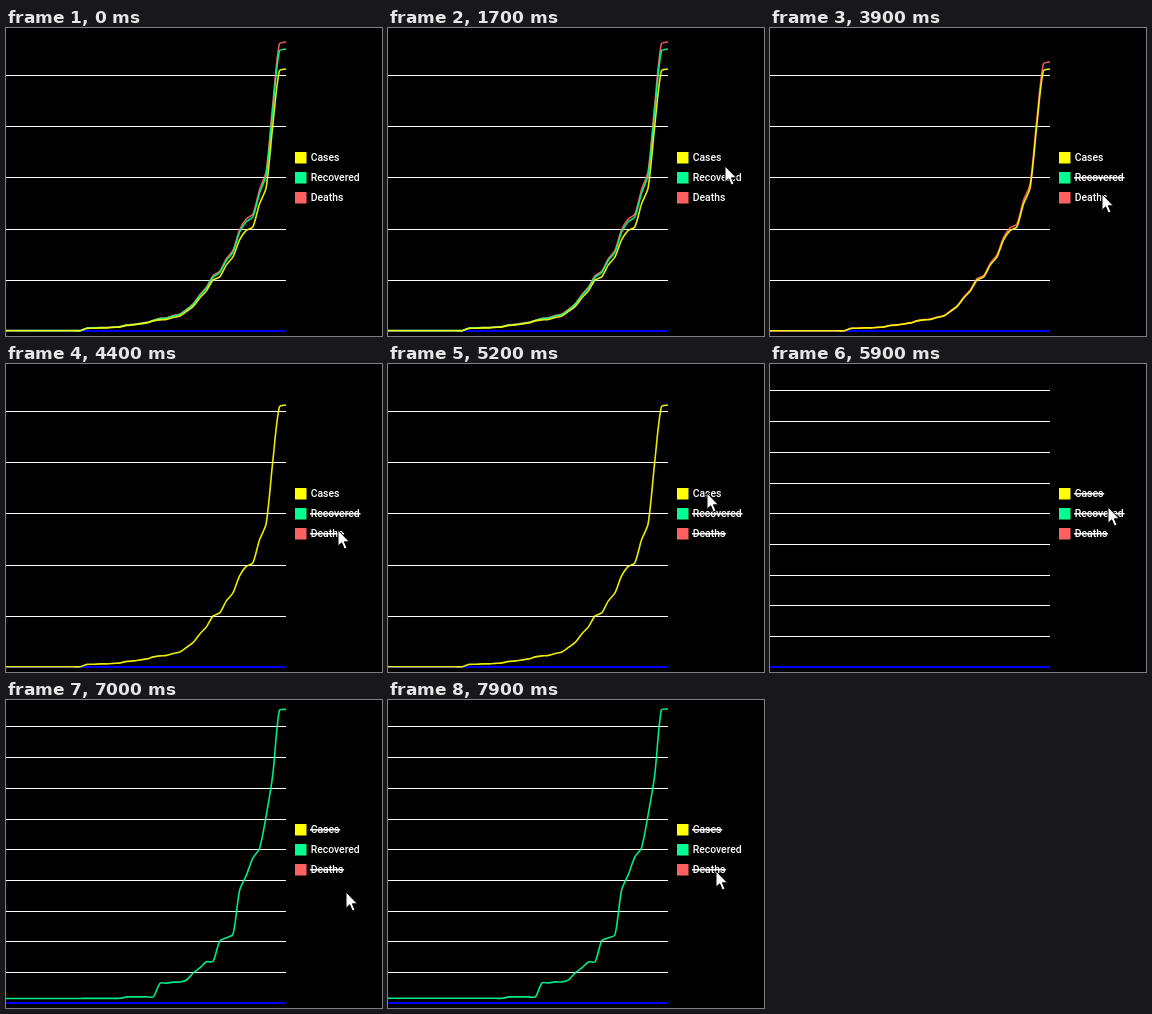
An HTML page that plays this animation: 376x308 px, repeating every 8000 ms.

```html
<!DOCTYPE html>
<html lang="en">
<head>
<meta charset="utf-8">
<title>Stacked line chart</title>
<style>
  html, body { margin: 0; width: 100%; height: 100%; overflow: hidden; background: #000; }
  svg { display: block; width: 376px; height: 308px; }
  text { font: 500 10.4px Roboto, Arial, sans-serif; fill: #fff; }
  .line { fill: none; stroke-width: 1.6; stroke-linejoin: round; }
</style>
</head>
<body>
<svg viewBox="0 0 376 308">
  <rect width="376" height="308"/>
  <g id="grid"></g>
  <rect y="302" width="280" height="2" fill="#00f"/>
  <g id="lines"></g>
  <g id="legend"></g>
  <path id="cursor" d="M0 0V16.2L3.7 12.8L6.3 19L9 17.9L6.4 11.8H11.4Z"
        fill="#fff" stroke="#000" stroke-width="1"/>
</svg>
<script>
const LOOP = 8000, STEP = 100, EASE_MS = 1000;
const BASE = 302.9, RIGHT = 280, GAP = 6.63;

// Moments at which a legend entry is clicked
const HIDE_RECOVERED = 2640, HIDE_DEATHS = 3950, HIDE_CASES = 5350, SHOW_RECOVERED = 6440;

// Heights in px, newest day first
const COUNT = 44;
const pad = (list, rest) => Array.from({ length: COUNT }, (_, i) => list[i] ?? rest);
const cases = pad([262, 260, 205, 143, 127, 104, 100.5, 91, 74, 66, 54, 51, 40, 33, 24.5, 19.5,
  15, 13.5, 11.5, 11, 10, 8, 7, 6, 5.5, 4, 3.5, 3, 3, 2.7, 2.5], 0.1);
const recoveredAlone = pad([294, 293, 228, 188, 155, 146, 128, 113, 68, 65, 62, 41, 41, 35, 30, 23,
  21, 21, 20, 20, 6, 6, 6, 6, 6], 4.6);
const recovered = cases.map((c, i) => c + recoveredAlone[i] * 0.068);
const deathsOnCases = cases.map(c => c * 1.027);
const deathsOnTop = cases.map((c, i) => recovered[i] + c * 0.027);

const cursorPath = [
  [1700, 337, 138], [1800, 340, 144], [2000, 332, 146], [2600, 332, 146],
  [2900, 332, 161], [3300, 332, 166], [4500, 332, 166], [4800, 319, 129],
  [5400, 319, 129], [5800, 338, 143], [6450, 338, 143], [6600, 323, 204],
  [7000, 340, 192], [7500, 328, 171], [LOOP, 328, 171]
];

const $ = id => document.getElementById(id);
function add(parent, tag, attrs, text = "") {
  const el = document.createElementNS("http://www.w3.org/2000/svg", tag);
  for (const k in attrs) el.setAttribute(k, attrs[k]);
  el.textContent = text;
  return parent.appendChild(el);
}
const show = (el, on) => el.setAttribute("visibility", on ? "visible" : "hidden");
const lerp = (a, b, p) => a + (b - a) * p;
const mix = (a, b, p) => a.map((v, i) => lerp(v, b[i], p));
const easeOut = p => 1 - (1 - Math.min(Math.max(p, 0), 1)) ** 4;

function makeGrid(gap) {
  const g = add($("grid"), "g", { fill: "#fff" });
  for (let y = BASE - gap; y > 0; y -= gap) {
    add(g, "rect", { y: Math.round(y), width: RIGHT, height: 1 });
  }
  return g;
}
const wideGrid = makeGrid(51.17), denseGrid = makeGrid(30.73);

const series = [["Cases", "#ffff00"], ["Recovered", "#00ff90"], ["Deaths", "#ff6060"]]
  .map(([name, color], i) => {
    const y = 124 + i * 20;
    add($("legend"), "rect", { x: 289, y, width: 11.5, height: 11.5, fill: color });
    const label = add($("legend"), "text", { x: 304.7, y: y + 9.3 }, name);
    const strike = add($("legend"), "rect", { x: 304, y: y + 5, height: 1.5, fill: "#fff" });
    return { label, strike, color };
  });
for (const s of [...series].reverse()) {
  s.line = add($("lines"), "path", { class: "line", stroke: s.color, "stroke-opacity": 0.92 });
}
const [casesItem, recoveredItem, deathsItem] = series;

// Cardinal spline whose handles scale with the neighbouring segment lengths
function spline(heights) {
  const pts = heights.map((h, i) => [RIGHT - i * GAP, BASE - h]);
  const handles = pts.map((p, i) => {
    const a = pts[i - 1] || p, b = pts[i + 1] || p;
    const before = Math.hypot(p[0] - a[0], p[1] - a[1]);
    const after = Math.hypot(b[0] - p[0], b[1] - p[1]);
    const k = 0.25 / (before + after);
    const at = s => [p[0] + (b[0] - a[0]) * s, p[1] + (b[1] - a[1]) * s];
    return [at(-k * before), at(k * after)];
  });
  let d = "M" + pts[0];
  for (let i = 1; i < pts.length; i++) {
    d += "C" + [handles[i - 1][1], handles[i][0], pts[i]].join(" ");
  }
  return d;
}

function setItem(item, on, heights) {
  show(item.line, on);
  show(item.strike, !on);
  if (!on) item.strike.setAttribute("width", item.label.getComputedTextLength() + 1.5);
  else item.line.setAttribute("d", spline(heights));
}

function moveCursor(t) {
  const next = cursorPath.findIndex(k => k[0] > t);
  show($("cursor"), next > 0);
  if (next < 1) return;
  const [t0, x0, y0] = cursorPath[next - 1], [t1, x1, y1] = cursorPath[next];
  const p = (t - t0) / (t1 - t0);
  $("cursor").setAttribute("transform", `translate(${lerp(x0, x1, p)} ${lerp(y0, y1, p)})`);
}

function draw(t) {
  const shownAgain = t >= SHOW_RECOVERED;
  const drop = easeOut((t - HIDE_RECOVERED) / EASE_MS);
  const rise = easeOut((t - SHOW_RECOVERED) / EASE_MS);
  show(wideGrid, t < HIDE_CASES);
  show(denseGrid, t >= HIDE_CASES);
  setItem(casesItem, t < HIDE_CASES, cases);
  setItem(recoveredItem, t < HIDE_RECOVERED || shownAgain, mix(recovered, recoveredAlone, rise));
  setItem(deathsItem, t < HIDE_DEATHS, mix(deathsOnTop, deathsOnCases, drop));
  moveCursor(t);
}

const start = performance.now();
function tick() {
  const t = (performance.now() - start) % LOOP;
  draw(Math.floor(t / STEP) * STEP);
  requestAnimationFrame(tick);
}
tick();
</script>
</body>
</html>
```
